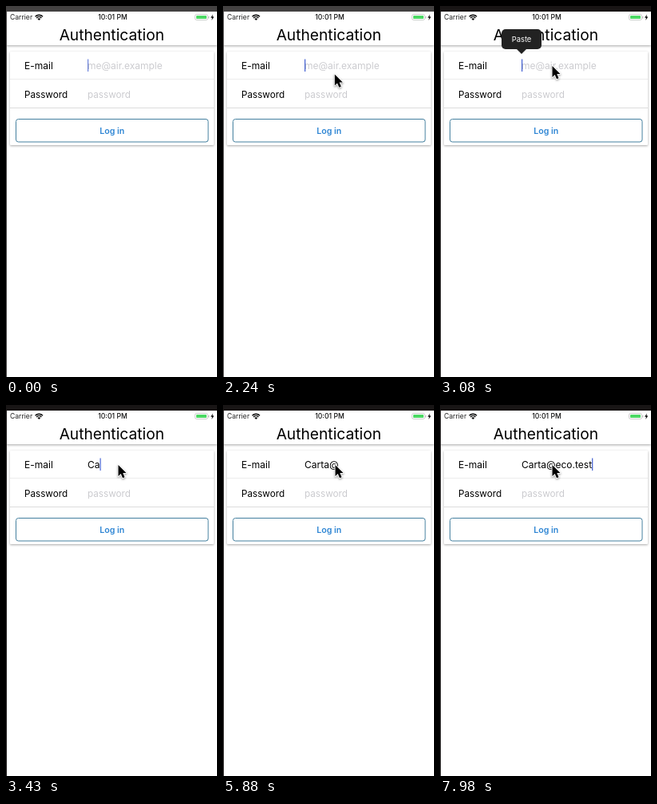
Animation of 264x464 px, one loop 8 s. Source, as an HTML page with a canvas:

```html
<!DOCTYPE html>
<html lang="en">
<head>
<meta charset="utf-8">
<title>Authentication</title>
<style>
  html, body { margin: 0; width: 100%; height: 100%; overflow: hidden; background: #fff; }
  canvas { display: block; width: 264px; height: 464px; }
</style>
</head>
<body>
<canvas id="stage"></canvas>
<script>
const W = 264, H = 464, LOOP = 8000, STEP = 70;
const FONT = 'Inter, Roboto, "Liberation Sans", sans-serif';
const INPUT_X = 102;
const HINT = '#cbcbcf';
const TYPED = 'Carta@eco.test';
const FOCUS_AT = 2450;
const KEY_GAP = 130;
const BURSTS = [
  { at: 3290, keys: 3 },
  { at: 3720, keys: 2 },
  { at: 4410, keys: 1 },
  { at: 7000, keys: 8 },
];

const canvas = document.getElementById('stage');
const ctx = canvas.getContext('2d');
const ratio = window.devicePixelRatio || 1;
canvas.width = W * ratio;
canvas.height = H * ratio;
ctx.scale(ratio, ratio);

const clamp = v => Math.min(1, Math.max(0, v));
const ramp = (t, from, to) => clamp((t - from) / (to - from));
const easeOut = u => 1 - (1 - u) ** 3;

function text(str, x, y, size, color = '#000', weight = 400, align = 'left') {
  ctx.font = `${weight} ${size}px ${FONT}`;
  ctx.textAlign = align;
  ctx.fillStyle = color;
  ctx.fillText(str, x, y);
}

function rect(x, y, w, h, color) {
  ctx.fillStyle = color;
  ctx.fillRect(x, y, w, h);
}

function rounded(x, y, w, h, r) {
  ctx.beginPath();
  ctx.roundRect(x, y, w, h, r);
}

function polygon(...points) {
  ctx.beginPath();
  points.forEach(([x, y]) => ctx.lineTo(x, y));
  ctx.closePath();
}

function fill(color) {
  ctx.fillStyle = color;
  ctx.fill();
}

function stroke(color, width) {
  ctx.strokeStyle = color;
  ctx.lineWidth = width;
  ctx.stroke();
}

function shadow(alpha, blur, dy) {
  ctx.shadowColor = `rgba(0,0,0,${alpha})`;
  ctx.shadowBlur = blur * ratio;
  ctx.shadowOffsetY = dy * ratio;
}

function isolated(draw) {
  ctx.save();
  draw();
  ctx.restore();
}

function drawWifi(x, y) {
  const wave = r => ctx.arc(x, y, r, -Math.PI * 0.75, -Math.PI * 0.25);
  for (const r of [4.4, 6.7]) {
    ctx.beginPath();
    wave(r);
    stroke('#000', 1.4);
  }
  ctx.beginPath();
  ctx.moveTo(x, y);
  wave(2.7);
  fill('#000');
}

function drawBattery() {
  rounded(236.5, 10.5, 16, 7, 2);
  stroke('#b8b8b8', 0.7);
  rounded(238, 12, 13, 4, 0.8);
  fill('#4cd964');
  rect(253.3, 13, 1, 2.5, '#b8b8b8');
  polygon([258.8, 10.5], [256.2, 14.8], [258, 14.8], [257.3, 18], [260.3, 13.5], [258.4, 13.5]);
  fill('#000');
}

function drawHeader(frameColor) {
  isolated(() => {
    shadow(0.35, 3, 1);
    rect(0, 6, W, 43, '#fff');
  });
  text('Carrier', 5, 17, 8.6, '#222');
  drawWifi(41.3, 18);
  text('10:01 PM', 133.5, 17, 8.6, '#111', 500, 'center');
  drawBattery();
  text('Authentication', 132.3, 42.5, 19.2, '#000', 400, 'center');
  rect(0, 0, W, 7, frameColor);
  rect(0, 0, 1, H, frameColor);
}

function drawCard() {
  isolated(() => {
    shadow(0.35, 3, 1);
    rounded(5, 57, 255, 117, 1);
    fill('#fff');
  });
  rect(5, 91, 255, 1, '#ececec');
  rect(5, 127, 255, 1, '#dcdcdc');
  text('E-mail', 23, 79, 12);
  text('Password', 23, 114.5, 11.7);
  text('password', INPUT_X, 114.5, 11.7, HINT);
  rounded(12.5, 141.5, 240.5, 28.5, 3);
  stroke('#44809f', 1);
  text('Log in', 132.7, 160, 10.6, '#2e86d4', 600, 'center');
}

function typing(t) {
  let count = 0, last = 0;
  for (const { at, keys } of BURSTS) {
    if (t < at) break;
    const done = Math.min(keys, Math.floor((t - at) / KEY_GAP) + 1);
    count += done;
    last = at + (done - 1) * KEY_GAP;
  }
  return { count, last };
}

// Opaque around each middle of the period, then a short fade on both sides.
function blink(t, middle, period) {
  const phase = (t - middle) / period;
  const distance = Math.abs(phase - Math.round(phase)) * period;
  return 1 - ramp(distance, period / 6, period / 6 + 210);
}

function drawEmail(t) {
  const { count, last } = typing(t);
  const value = TYPED.slice(0, count);
  text(value || 'me@air.example', INPUT_X, 79, 12, value ? '#000' : HINT);
  const x = INPUT_X + (value ? ctx.measureText(value).width : 0);
  ctx.globalAlpha = value ? blink(t - last, 300, 1680) : blink(t, 215, 1000);
  rect(x, 66.5, 1.2, 15.5, '#4260d2');
  ctx.globalAlpha = 1;
}

function drawMenu(t) {
  ctx.globalAlpha = ramp(t, 2870, 3080) - ramp(t, 3220, 3430);
  rounded(77, 29, 50, 25, 5);
  fill('#222');
  polygon([95.5, 53.5], [108.5, 53.5], [102, 60]);
  fill('#222');
  text('Paste', 102, 45, 9.4, '#fff', 400, 'center');
  ctx.globalAlpha = 1;
}

function drawPointer(t) {
  if (t < STEP) return;
  const toButton = easeOut(ramp(t, 70, 630));
  const toInput = easeOut(ramp(t, 1890, 2600));
  isolated(() => {
    ctx.translate(152 - 17 * toButton + 5.5 * toInput, 412 - 257 * toButton - 80 * toInput);
    polygon([0, 0], [0, 14], [3.2, 11], [5.5, 16.3], [8, 15.2], [5.8, 10], [10, 10]);
    ctx.lineJoin = 'round';
    shadow(0.4, 2.5, 1.2);
    stroke('#fff', 1.8);
    ctx.shadowColor = 'transparent';
    fill('#000');
  });
}

function draw(t) {
  rect(0, 0, W, H, '#fff');
  drawHeader(t < FOCUS_AT ? '#434141' : '#181515');
  drawCard();
  drawEmail(t);
  drawMenu(t);
  drawPointer(t);
}

const start = performance.now();
function tick() {
  const t = (performance.now() - start) % LOOP;
  draw(Math.floor(t / STEP) * STEP);
  requestAnimationFrame(tick);
}
tick();
</script>
</body>
</html>
```
